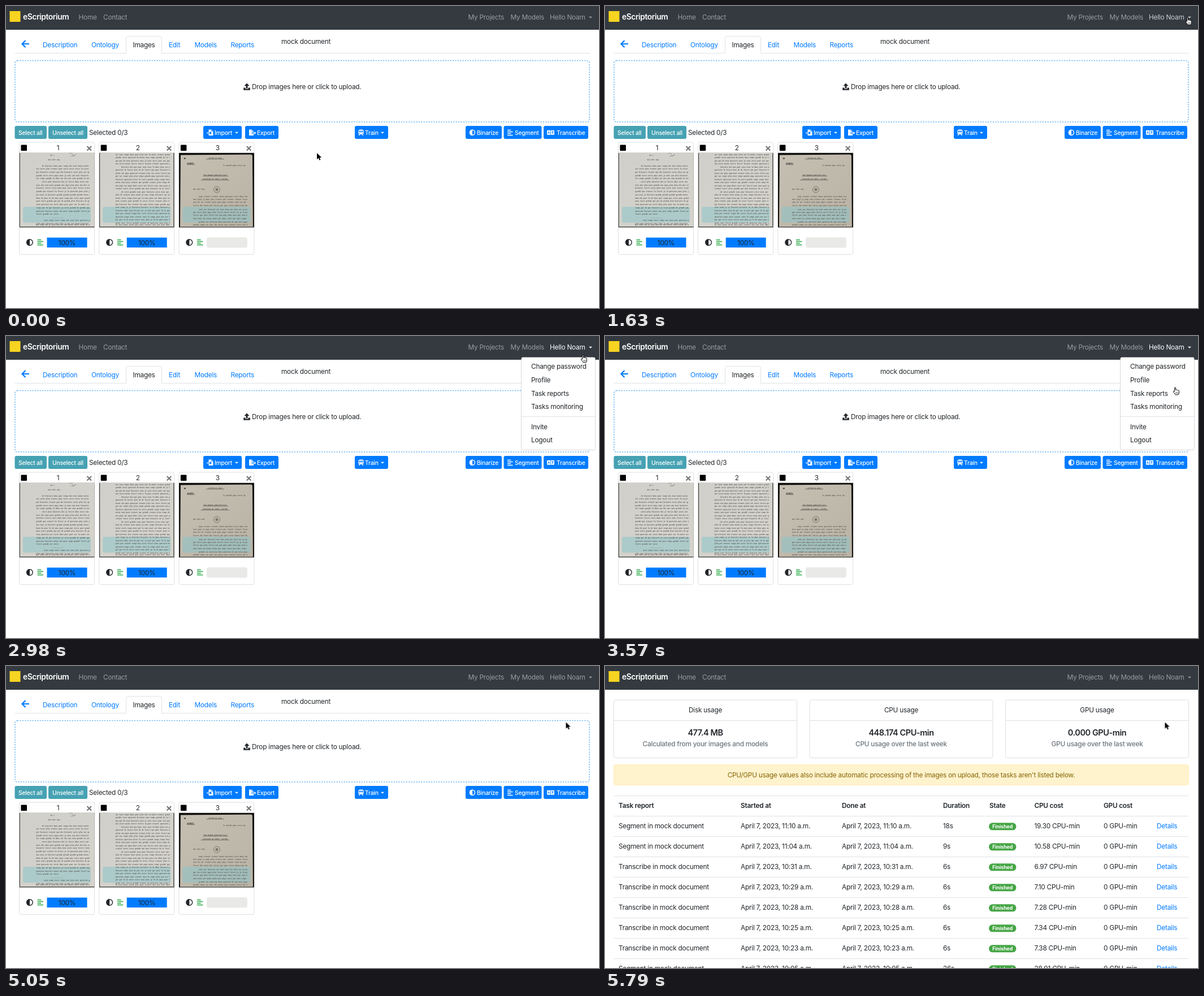
Animation, 1049 px wide and 534 px high, one loop 7590 ms. Source, as an HTML page:

```html
<!DOCTYPE html>
<html lang="en">
<head>
<meta charset="utf-8">
<title>Task reports</title>
<style>
html, body { margin: 0; width: 100%; height: 100%; overflow: hidden; background: #fff; }
svg { display: block; width: 1049px; height: 534px; }
text { font: 11.8px Inter, sans-serif; letter-spacing: -.019em; fill: #212529; white-space: pre; }
.mid { text-anchor: middle; }
.link { fill: #007bff; }
.nav { fill: #9a9da0; }
.brand { font-size: 13.8px; font-weight: 600; letter-spacing: -.03em; fill: #fff; }
.btn { font-size: 10.3px; font-weight: 500; letter-spacing: -.02em; fill: #fff; }
.big { font-size: 14.5px; font-weight: 600; letter-spacing: -.03em; }
.sub { font-weight: 500; fill: #6c757d; }
.head { font-weight: 600; }
.warn { fill: #856404; }
.badge { font-size: 8.8px; font-weight: 700; letter-spacing: -.01em; fill: #fff; }
.tiny { font: bold 2.87px "Liberation Mono", monospace; letter-spacing: 0; fill: #5f5d58; }
.title { font: bold 4.6px "Liberation Mono", monospace; letter-spacing: 0; fill: #35322e; }
.line { fill: none; stroke: #dee2e6; }
.white { fill: none; stroke: #fff; stroke-width: 1.4; }

#docs, #report, #menu, #user, #bar, #cursor, #arrow, #hand, #hit, #hitText {
  animation: 7590ms step-end infinite;
}
#docs { animation-name: docs; }
#report { animation-name: report; }
#menu { animation-name: menu; }
#user { animation-name: user; fill: #9a9da0; }
#user text { fill: inherit; }
#bar { animation-name: bar; }
#cursor { animation-name: move; }
#arrow { animation-name: arrow; }
#hand { animation-name: hand; }
#hit { animation-name: hit; }
#hitText { animation-name: hitText; }

@keyframes docs { 0% { visibility: visible } 68.37%, to { visibility: hidden } }
@keyframes report { 0% { visibility: hidden } 68.37%, to { visibility: visible } }
@keyframes menu { 0% { opacity: 0 } 29.38% { opacity: 1 } 66.53%, to { opacity: 0 } }
@keyframes hit { 0% { opacity: 0 } 64.55% { opacity: 1 } 66.53%, to { opacity: 0 } }
@keyframes hitText { 0% { fill: #212529 } 64.55% { fill: #fff } 66.53%, to { fill: #212529 } }
@keyframes user {
  0% { fill: #9a9da0 } 19.49% { fill: #ccced0 } 29.38% { fill: #fff } 66.53%, to { fill: #9a9da0 }
}
@keyframes bar { 0% { opacity: 0 } 68.37% { opacity: 1 } 74.30% { opacity: .5 } 76.28%, to { opacity: 0 } }
@keyframes arrow { 0% { opacity: 1 } 19.49% { opacity: 0 } 66.53%, to { opacity: 1 } }
@keyframes hand { 0% { opacity: 0 } 19.49% { opacity: 1 } 66.53%, to { opacity: 0 } }
@keyframes move {
  0% { transform: translate(550px, 260px) }
  11.72% { transform: translate(587px, 241px) }
  13.70% { transform: translate(748px, 154px) }
  15.67% { transform: translate(921px, 68px) }
  17.52% { transform: translate(982px, 38px) }
  19.49% { transform: translate(1011px, 25px) }
  21.47% { transform: translate(1026px, 19.5px) }
  39.26% { transform: translate(1016px, 33px) }
  41.23% { transform: translate(1010px, 46px) }
  43.08% { transform: translate(1008px, 61px) }
  45.05% { transform: translate(1005px, 76px) }
  47.03% { transform: translate(1004px, 90px) }
  48.88% { transform: translate(1003px, 98px) }
  50.85% { transform: translate(1003px, 100px) }
  52.83% { transform: translate(997px, 100px) }
  54.80% { transform: translate(988px, 100px) }
  66.53%, to { transform: translate(990.5px, 99.5px) }
}
</style>
</head>
<body>
<svg id="stage" viewBox="0 0 1049 534"></svg>
<script>
const BLUE = '#007bff', TEAL = '#46a2b3';

// y is the middle of the capitals
const text = (x, y, s, cls = '', attr = '') =>
  `<text x="${x}" y="${y}" dy=".36em" class="${cls}" ${attr}>${s}</text>`;
const rect = (x, y, w, h, fill, r = 0, attr = '') =>
  `<rect x="${x}" y="${y}" width="${w}" height="${h}" rx="${r}" fill="${fill}" ${attr}/>`;
const path = (d, attr) => `<path d="${d}" ${attr}/>`;
const at = (x, y, body) => `<g transform="translate(${x} ${y})">${body}</g>`;
const caret = (x, y, attr = 'fill="#fff"') => path(`M${x} ${y}h6l-3 3z`, attr);
const texts = (items, y, cls) => items.map(([x, s]) => text(x, y, s, cls)).join('');

let seed = 7;
const rnd = () => (seed = seed * 16807 % 2147483647) / 2147483647;
const WORDS = 'de la que je vous pour dans avec votre lettre une par des sur nous plus cette temps moins trouver pays grande histoire question'.split(' ');
const prose = n => {
  let s = '';
  while (s.length < n) s += WORDS[rnd() * WORDS.length | 0] + ' ';
  return s.slice(0, n);
};
const lines = (x, y, count, step, n, indent = 0) => {
  let out = '';
  for (let i = 0; i < count; i++) {
    const pad = i ? 0 : indent;
    out += text(x + pad * 1.72, y + i * step, prose(n - pad), 'tiny');
  }
  return out;
};

const half = (r, c) => `<circle r="${r - .7}" fill="none" stroke="${c}" stroke-width="1.4"/>` +
  path(`M0 ${-r}a${r} ${r} 0 0 0 0 ${2 * r}z`, `fill="${c}"`);
const rows = (c, w) => path(`M0 0h${w * .65}M0 3h${w}M0 6h${w * .65}M0 9h${w}`,
  `fill="none" stroke="${c}" stroke-width="1.5"`);
const file = path('M0 0h5l3 3v7.5h-8z', 'fill="#fff"') +
  path('M5 0v3h3', `fill="none" stroke="${BLUE}" stroke-width=".8"`);
const importIcon = at(2.5, 0, file) + path('M-1 6h5', 'stroke="#fff" stroke-width="1.5"') +
  path('M2.5 6h3M5 3.8l2.4 2.2-2.4 2.2z', `fill="${BLUE}" stroke="${BLUE}"`);
const exportIcon = file + path('M4 6h5', `stroke="${BLUE}" stroke-width="1.5"`) +
  path('M8 5.3h1.6v-2l2.6 2.7-2.6 2.7v-2h-1.6z', 'fill="#fff"');
const trainIcon = rect(0, 0, 9, 8.5, '#fff', 2.5) + rect(1.3, 2, 2.7, 2.6, BLUE) + rect(5, 2, 2.7, 2.6, BLUE) +
  `<circle cx="2.4" cy="6.5" r=".8" fill="${BLUE}"/><circle cx="6.6" cy="6.5" r=".8" fill="${BLUE}"/>` +
  path('M2 8l-1 2.5M7 8l1 2.5', 'class="white"');
const langIcon = rect(0, 0, 13, 8, '#fff', 1) +
  path('M1.5 6l1.7-4 1.7 4M2.2 4.8h2M6.5 0v8M8 2.5h4M10 1.5v1M8.4 6q2.4-1 2.8-3.5M8.8 3q1 2.5 2.8 3',
    `fill="none" stroke="${BLUE}" stroke-width=".8"`);

const button = (x, w, label, tx, icon = '', fill = BLUE) =>
  rect(x, 212, w, 23, fill, 3) + icon + text(tx, 224, label, 'btn');

const overlay = rect(6.5, 95.5, 120, 28, '#8cc5cb', 3, 'opacity=".55"');
const page = (edge, body) => rect(0, 0, 133, 132, edge) + body;
const scans = [
  page('#4a4a47', rect(1.5, 0, 131.5, 130.5, 'url(#paper)') + overlay +
    text(55, 4, 'No 1', 'tiny') + text(51, 12, 'Mon cher ami,', 'tiny') +
    path('M88 2q5-4 6 1t6 0M91 6q5 1 9-3', 'fill="none" stroke="#77756f" stroke-width=".6"') +
    lines(30, 23, 5, 5.7, 55, 6) + lines(30, 51.5, 9, 5.7, 55, 6) + lines(30, 103, 1, 5.7, 55) +
    text(30, 108.5, prose(24), 'tiny') + text(57, 114, '------------', 'tiny') +
    lines(30, 119.5, 2, 5.7, 55, 8) + lines(30, 127.5, 1, 5.7, 55)),
  page('#4a4a47', rect(1.5, 0, 130, 130.5, 'url(#paper)') + overlay +
    lines(29, 3, 4, 5.5, 56) + lines(29, 25, 8, 5.5, 56, 6) + lines(29, 69, 11, 5.5, 56, 6) + lines(29, 127, 1, 5, 56)),
  page('#0e0d0c', path('M3 4L127 3Q130 3 130 6L131 131H2z', 'fill="url(#tan)"') + overlay +
    rect(9, 9, 3, 2, '#3a3631') + text(64, 9, 'LETTRE DU MOIS', 'tiny mid') + rect(48, 11, 32, .6, '#3a3631') +
    text(14, 20, 'AVRIL', 'title') + text(78, 22, 'le ' + prose(20), 'tiny') +
    text(64, 39, 'UNE GRANDE QUESTION PAYS', 'tiny mid') + rect(43, 41, 44, .6, '#3a3631') +
    text(64, 46, 'HISTOIRE DE TEMPS, LETTRE', 'tiny mid') + rect(39, 48, 50, .6, '#3a3631') +
    text(25, 64, 'Mon cher ami,', 'tiny') +
    '<circle cx="67" cy="65" r="5.5" fill="none" stroke="#6b655c" stroke-width=".8"/><circle cx="67" cy="65" r="2.5" fill="#7d766b"/>' +
    lines(25, 77, 4, 5.4, 56, 6) + lines(25, 100, 4, 5.4, 56, 6) + lines(25, 122.5, 2, 5.2, 56, 6)),
];

const card = (scan, i) => at(i * 141.2, 0,
  rect(23.5, 241, 133, 198.5, '#fff', 3, 'stroke="#dfdfdf"') +
  rect(26.5, 245.5, 10.5, 10.5, '#000', 1) + text(92, 250.5, i + 1, 'mid') +
  path('M143.5 248l7.5 7.5m0-7.5l-7.5 7.5', 'stroke="#777" stroke-width="2.2"') +
  `<svg x="23.5" y="259.5" style="width:133px;height:131.5px">${scan}</svg>` +
  at(42, 418, half(6, '#212529')) + at(55.5, 413.5, rows('#28a745', 10.5)) +
  (i < 2 ? rect(72.5, 409.5, 71, 17.5, BLUE) + text(108, 418.3, '100%', 'mid')
         : rect(72.5, 409, 72, 18.5, '#e9e9e7', 4)));

const nav = rect(0, 0, 1049, 42, '#343a40') + rect(6.5, 9, 19, 19, '#f7d421') +
  text(30, 19.5, 'eScriptorium', 'brand') +
  texts([[128.5, 'Home'], [172, 'Contact'], [817.5, 'My Projects'], [892.5, 'My Models']], 20, 'nav') +
  `<g id="user">${text(962, 20, 'Hello Noam')}${caret(1031, 18.7, '')}</g>`;

const menu = rect(911.5, 37.5, 131, 164, '#fff', 3, 'stroke="#000" stroke-opacity=".15"') +
  rect(912, 89.5, 130, 23.5, BLUE, 0, 'id="hit"') +
  text(929, 54, 'Change password') + text(929, 77.5, 'Profile') +
  text(929, 101.5, 'Task reports', '', 'id="hitText"') + text(929, 125, 'Tasks monitoring') +
  path('M912 142.5h130', 'class="line"') + text(929, 160.5, 'Invite') + text(929, 184, 'Logout');

const docs =
  path('M15.5 83.5H212.5V57q0-3.5 3.5-3.5H272q3.5 0 3.5 3.5V83.5H1033', 'class="line"') +
  path('M41 67H29M34.5 61l-6 6 6 6', `fill="none" stroke="${BLUE}" stroke-width="2.2"`) +
  texts([[65, 'Description'], [151, 'Ontology'], [288, 'Edit'], [333.5, 'Models'], [397.5, 'Reports']], 69, 'link') +
  text(224.5, 69, 'Images') + text(487, 62.5, 'mock document') +
  rect(16, 96.5, 1016, 108.5, 'none', 4, 'stroke="#68b5f5" stroke-width="1.5" stroke-dasharray="2.2 2.2"') +
  path('M426 136.5l4.5 4.8h-3v4.2h-3v-4.2h-3z', 'fill="#212529"') +
  path('M420.2 144.5h3.2v2h5.2v-2h3.2v4.2h-11.6z', 'fill="#212529"') +
  text(435, 143, 'Drop images here or click to upload.') +
  button(15.5, 56.5, 'Select all', 22, '', TEAL) + button(75, 69, 'Unselect all', 82, '', TEAL) +
  text(147, 223.5, 'Selected 0/3') +
  button(349, 68, 'Import', 369, at(356, 218.5, importIcon) + caret(405, 222.7)) +
  button(423, 59, 'Export', 444, at(430, 218.5, exportIcon)) +
  button(617, 59, 'Train', 635, at(623.5, 218.5, trainIcon) + caret(663, 222.7)) +
  button(813, 64, 'Binarize', 833, at(825, 223.7, half(5.2, '#fff'))) +
  button(880.5, 67, 'Segment', 900, at(887, 219.5, rows('#fff', 9.5))) +
  button(951, 79, 'Transcribe', 974, at(957, 219.7, langIcon)) +
  scans.map(card).join('') + `<g id="menu">${menu}</g>`;

const usage = (x, name, value, note) =>
  rect(x, 60, 324, 102.5, '#fff', 3, 'stroke="#dfdfdf"') + path(`M${x} 96.5h324`, 'stroke="#dfdfdf"') +
  text(x + 162, 78, name, 'mid') + text(x + 162, 117.5, value, 'big mid') + text(x + 162, 137.5, note, 'sub mid');

const COLS = [24, 240, 419, 598, 680, 759.5, 882, 976];
const tasks = [
  ['Segment', '11:10', 18, '19.30'], ['Segment', '11:04', 9, '10.58'], ['Transcribe', '10:31', 6, '6.97'],
  ['Transcribe', '10:29', 6, '7.10'], ['Transcribe', '10:28', 6, '7.28'], ['Transcribe', '10:25', 6, '7.34'],
  ['Transcribe', '10:23', 6, '7.38'], ['Segment', '10:05', 26, '28.91'],
];
const taskRow = ([kind, time, secs, cost], i) => {
  const y = 283 + 36 * i, when = `April 7, 2023, ${time} a.m.`;
  const cells = [`${kind} in mock document`, when, when, secs + 's', '', cost + ' CPU-min', '0 GPU-min'];
  return path(`M15.5 ${y - 17.5}H1032.5`, 'class="line"') +
    texts(cells.map((s, c) => [COLS[c], s]), y, '') +
    rect(679, y - 5.7, 48.5, 13, '#46a646', 6.5) + text(703.2, y + 1, 'Finished', 'badge mid') +
    text(COLS[7], y, 'Details', 'link');
};
const heads = ['Task report', 'Started at', 'Done at', 'Duration', 'State', 'CPU cost', 'GPU cost'];

const report =
  usage(15.5, 'Disk usage', '477.4 MB', 'Calculated from your images and models') +
  usage(362, 'CPU usage', '448.174 CPU-min', 'CPU usage over the last week') +
  usage(708.5, 'GPU usage', '0.000 GPU-min', 'GPU usage over the last week') +
  rect(15.5, 174.5, 1017, 36, '#fff3cd', 3, 'stroke="#ffeeba"') +
  text(524, 193, "CPU/GPU usage values also include automatic processing of the images on upload, those tasks aren't listed below.", 'warn mid') +
  path('M15.5 229.5H1032.5', 'class="line"') + texts(heads.map((s, c) => [COLS[c], s]), 247, 'head') +
  tasks.map(taskRow).join('');

const cursor =
  path('M0 0V11.2L2.7 8.7 4.5 12.8 6.4 12 4.7 8H8.2z',
    'id="arrow" fill="#000" stroke="#fff" stroke-width="1.2" paint-order="stroke"') +
  `<g id="hand" stroke="#000" stroke-width="1">` +
  path('M3.6 8.2V1.8Q3.6.8 4.6.8T5.6 1.8V5.4Q6.6 4.6 7.6 5.6 8.8 5 9.6 6.1 11.4 5.8 11.4 7.6V10Q11.4 12 10.2 13.8H5Q4 12 1.6 9.2.8 7.8 2 7.4 2.8 7.3 3.6 8.2z', 'fill="#fff"') +
  path('M5.7 9.3v2.6M7.4 9.3v2.6M9.1 9.3v2.6', 'stroke-width=".6"') + '</g>';

const gradient = (id, a, b) => `<linearGradient id="${id}" x2="1" y2="1">
  <stop stop-color="${a}"/><stop offset="1" stop-color="${b}"/></linearGradient>`;

document.getElementById('stage').innerHTML =
  `<defs>${gradient('paper', '#d0cfc9', '#d5d3cc')}${gradient('tan', '#c5bfb2', '#bab3a5')}</defs>` +
  nav + `<g id="docs">${docs}</g><g id="report">${report}</g>` +
  rect(1047, 0, 6, 289, '#6f6f6f', 2, 'id="bar"') + `<g id="cursor">${cursor}</g>`;
</script>
</body>
</html>
```
